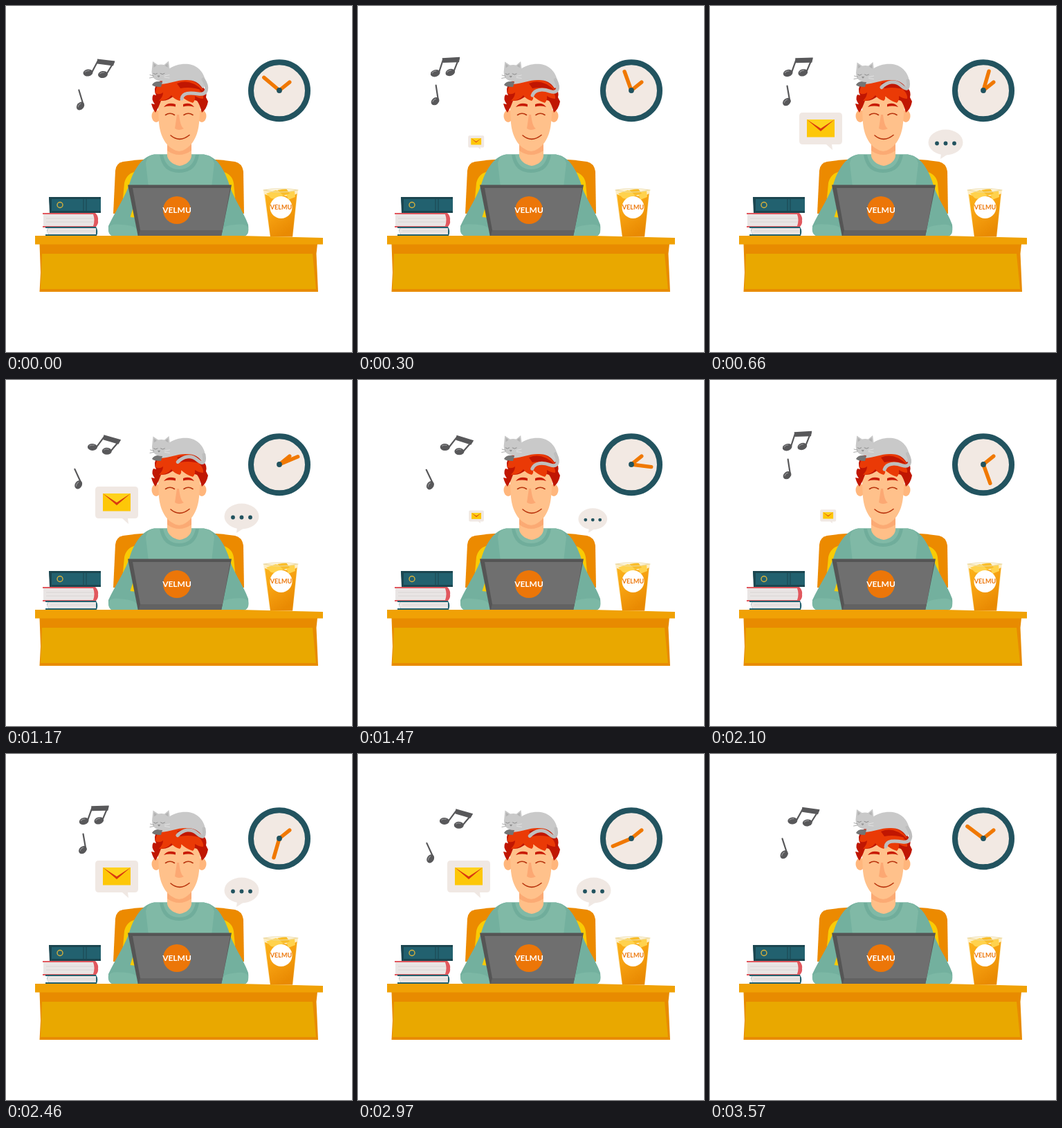
An HTML page for the animation above (3600 ms loop, 500 by 500 pixels).

```html
<!DOCTYPE html>
<html lang="en">
<head>
<meta charset="utf-8">
<title>Desk break</title>
<style>
html, body { margin: 0; width: 100%; height: 100%; overflow: hidden; background: #fff; }
svg { display: block; width: 100vw; height: 100vh; }
text { font-family: Lato, "Open Sans", sans-serif; font-weight: 700; text-anchor: middle; }
.line { fill: none; stroke-linecap: round; stroke-linejoin: round; }
</style>
</head>
<body>
<svg viewBox="0 0 500 500">
  <defs>
    <linearGradient id="juice" x1="0" y1="0" x2=".5" y2="1">
      <stop offset="0" stop-color="#fcb41c"/><stop offset=".5" stop-color="#f6a010"/>
      <stop offset="1" stop-color="#e98a02"/>
    </linearGradient>
  </defs>

  <!-- clock -->
  <circle cx="395" cy="122.300" r="41" fill="#f2e9e3" stroke="#22535f" stroke-width="8"/>
  <g class="line" stroke="#f07800" stroke-width="5.400">
    <path d="M395 122V103" transform="rotate(51 395 122)"/>
    <path id="minute" d="M395 122V93"/>
  </g>
  <circle cx="395" cy="122" r="3.900" fill="#22535f"/>

  <!-- music -->
  <g id="pair" fill="#58585a">
    <ellipse cx="118.500" cy="96.500" rx="7" ry="5" transform="rotate(-8 118.500 96.500)"/>
    <ellipse cx="140" cy="99" rx="7" ry="5" transform="rotate(-8 140 99)"/>
    <path d="M132 76.500L157.500 79.500L155 86.500L132 83.500Z"/>
    <path class="line" d="M124 96L133 79M145.500 98L155.800 81" stroke="#58585a" stroke-width="2.200"/>
    <path class="line" d="M114 95.500Q116.500 93 120.500 93.500M135.500 98Q138 95.500 142 96" stroke="#98989a" stroke-width="1"/>
  </g>
  <g id="single" fill="#58585a">
    <ellipse cx="107.500" cy="144.500" rx="6.500" ry="5" transform="rotate(-50 107.500 144.500)"/>
    <path class="line" d="M112 143.500L105.300 121.500" stroke="#58585a" stroke-width="2.200"/>
    <path class="line" d="M104 146Q105 142 108 141" stroke="#98989a" stroke-width="1"/>
  </g>

  <!-- chair -->
  <path d="M155 300L158 238Q159 227 169 225Q250 214 331 225Q341 227 343 239L344 300Z" fill="#ec8a00"/>
  <path d="M165 320L171 256Q174 242 188 239H312Q327 243 329 256L335 320Z" fill="#f9cb05"/>

  <!-- body -->
  <path d="M214 214.500C198 217 187 233 180 252C174 274 158 296 148 318Q147 333 158 333H342Q352 333 350 316C343 296 327 276 321 253C314 234 304 217 286 214.500Z" fill="#73b09e"/>
  <path d="M214 214.500Q203 217 202 227L206 262H297L301 227Q299 217 286 214.500Z" fill="#80b9a6"/>
  <path d="M222 215Q226 241 250 241Q275 241 279 215Z" fill="#70ad9b"/>
  <path d="M227 215Q231 236 250 236Q270 236 274 215Z" fill="#80b9a6"/>
  <path d="M184.500 289L179.500 305L188 306Z" fill="#f9cb05"/>
  <path id="armL" d="M148 321Q150 314 167 316Q187 317 190 324V333H158Q147 333 148 321Z" fill="#7cb8a5"/>
  <path id="armR" d="M350 321Q348 314 331 316Q315 317 310 324V333H340Q352 333 350 321Z" fill="#7cb8a5"/>

  <!-- head -->
  <path d="M233 190H268V217Q266 228 251 231Q236 228 233 217Z" fill="#ffbf88"/>
  <path d="M233 198Q250 222 268 198V209Q250 221 233 209Z" fill="#fbaa74"/>
  <ellipse cx="217" cy="159" rx="6.500" ry="9" fill="#ffb67c"/>
  <ellipse cx="283" cy="159" rx="6.500" ry="9" fill="#ffb67c"/>
  <path d="M219 132Q250 112 282 132L279 169C277 191 266 208 250 209C234 208 223 191 221 169Z" fill="#ffc18b"/>
  <path d="M247 157L244 177Q250 181 257 177Q252 175 250 157Z" fill="#fca873"/>
  <g class="line" stroke="#b8330c" stroke-width="1.600">
    <path d="M230.500 157.500Q237 153 243.500 157.500M257 157.500Q263.500 153 270 157.500"/>
    <path d="M238 187Q251 198 265 186.500"/>
  </g>
  <path d="M228 146Q234 138 245 142V145.500Q236 143.500 228 146ZM256 142Q266 138 272 146Q264 143.500 256 145.500Z" fill="#c81a02"/>
  <path d="M216 154Q212 149 210 141L215 142Q209 134 213 128L217 129Q212 120 219 111Q232 99 257 102Q281 104 286 119Q291 123 289 132L292 138Q290 149 283 154Q280 142 276 137Q262 133 245 128Q234 138 224 137Q221 146 216 154Z" fill="#c01602"/>
  <path d="M217 120Q222 104 254 105Q276 106 285 122L279 121Q286 127 285 134Q279 134 273 130Q274 136 270 140Q260 137 253 130Q254 135 251 137Q243 135 239 129Q233 137 221 137Q227 131 227 125Q222 129 216 126Z" fill="#ea3a06"/>
  <path d="M247 112Q266 104 284 122Q268 116 252 119Z" fill="#c01602"/>

  <!-- cat -->
  <path d="M233 93C243 84 256 83 264 84C278 86 288 98 288 111Q288 117 284 119C279 111 272 107 262 107C249 106 238 112 224 113Z" fill="#c9c9c9"/>
  <path class="line" id="tail" stroke="#bebebe" stroke-width="5"/>
  <path d="M211 114Q215 107 226 110L224 117Q213 117 211 114Z" fill="#747474"/>
  <g id="catHead">
    <path d="M212 80L219.500 85Q224 84 228.500 85L235 79.500L237 95Q238 108 224.500 108.500Q211 108 210.500 95Z" fill="#c9c9c9"/>
    <path d="M213.500 83L217.500 86L213.500 89ZM233.500 83L229.500 86L234 89Z" fill="#b2b2b2"/>
    <g class="line" stroke="#858585" stroke-width=".9">
      <path d="M213 97.500Q215.500 100 218.500 97.500M223 97.500Q226 100 229 97.500"/>
      <path d="M219.500 101H222L220.800 102.500Z"/>
      <path d="M213 101L208 99.500M213 103L207.500 104" stroke-width=".7"/>
      <path d="M229 101L236 99.500M229 103L236 104" stroke="#e8e8e8" stroke-width=".8"/>
    </g>
  </g>

  <!-- laptop -->
  <path d="M176 258.500H326L311 333.500H191Z" fill="#555"/>
  <path d="M183 263H324L313 324H194Z" fill="#6f6f6f"/>
  <path d="M194 324H313L311 332H192Z" fill="#626262"/>
  <circle cx="247" cy="295" r="20" fill="#ec7608"/>
  <text x="247" y="299.300" font-size="12" fill="#fff">VELMU</text>

  <!-- books -->
  <path d="M62 276H137V299H64Z" fill="#22616f"/>
  <path d="M62 276H137V279H66V296H137V299H63Z" fill="#1b4650"/>
  <path d="M112 279V296M116 279V296" stroke="#1b4650"/>
  <circle cx="78" cy="287.500" r="4" fill="none" stroke="#d9b23c" stroke-width="1.400"/>
  <path d="M53 299H129Q134 304 133 310Q134 315 129 320H53V318H57Q53 309 57 301H53Z" fill="#e1585e"/>
  <path d="M54 301H126Q129 309 126 318H54Z" fill="#e9e5e4"/>
  <path d="M57 319H130Q134 325 131 332H57V330H62Q57 325 61 321H57Z" fill="#22616f"/>
  <path d="M61 321H130V330H62Q57 326 61 321Z" fill="#e9e5e4"/>
  <path d="M58 307H126M58 312H126M64 325H129" stroke="#d9d4d3"/>

  <!-- cup -->
  <path d="M372 266H422L414.500 333.500H381.500Z" fill="#fdeec5"/>
  <path d="M374 272Q386 278 398 273Q411 278 420.500 271L414 333.500H382Z" fill="url(#juice)"/>
  <path d="M376 271L390 266L402 271L396 280L383 278ZM404 269L417 267L418 276L408 280Z" fill="#ffd24d"/>
  <path d="M392 266L405 264L410 271L401 274Z" fill="#f9bd2a"/>
  <path class="line" d="M372 266Q397 262 422 266Q397 272 372 266Z" stroke="#ecd9a0" stroke-width="1.200"/>
  <circle cx="397.500" cy="291" r="16" fill="#fff"/>
  <text x="397.500" y="294.300" font-size="9" fill="#ec7608">VELMU</text>

  <!-- desk -->
  <path d="M48.500 344H450L448.500 358L451 413H48.500L50 385Z" fill="#e88b00"/>
  <path d="M52 358H443L448 409H50Z" fill="#e9a800"/>
  <path d="M42 332H338L458 335V344.500H42Z" fill="#f0a105"/>

  <!-- bubbles -->
  <g id="mail">
    <path d="M134 154H186Q191 154 191 159V195Q191 200 186 200H176L177 208L168 200H134Q129 200 129 195V159Q129 154 134 154Z" fill="#f0e8e3"/>
    <path d="M140 164H180V189.500H140Z" fill="#fdc708"/>
    <path d="M140 164H180L160 179Z" fill="#ffd21c"/>
    <path d="M140 164L160 177L180 164L160 181Z" fill="#d93a10"/>
  </g>
  <g id="chat">
    <path d="M334 213L333 221L344 214Z" fill="#f0e8e3"/>
    <ellipse cx="340.500" cy="197" rx="25" ry="18.500" fill="#f0e8e3"/>
    <g fill="#22535f"><circle cx="328" cy="198.500" r="2.900"/><circle cx="340.500" cy="198.500" r="2.900"/><circle cx="353" cy="198.500" r="2.900"/></g>
  </g>
</svg>
<script>
const LOOP = 3600, BEAT = 1800, TAU = Math.PI * 2;
const $ = id => document.getElementById(id);
const move = (id, value) => $(id).setAttribute('transform', value);
const clamp = v => Math.max(0, Math.min(1, v));

const tailLow = [285, 106, 293, 118, 291, 129, 278, 127, 266, 125, 255, 125, 254, 134];
const tailHigh = [286, 108, 288, 121, 284, 122, 276, 115, 267, 107, 256, 110, 248, 118];

function tailPath(k) {
  const p = tailLow.map((v, i) => (v + (tailHigh[i] - v) * k).toFixed(2));
  return `M${p.slice(0, 2)}C${p.slice(2)}`;
}

// Grows a bubble out of its pointer, then shrinks it back.
function pop(id, x, y, t, start, end) {
  const u = clamp(Math.min((t - start) / 150, (end - t) / 150));
  const s = u * (2 - u);
  move(id, `translate(${x} ${y}) scale(${s}) translate(${-x} ${-y})`);
  $(id).style.display = s > 0 ? '' : 'none';
}

function draw(time) {
  const t = time % BEAT;
  const phase = TAU * t / BEAT;
  const sway = Math.sin(phase);
  const lift = (1 - Math.cos(phase)) / 1.63;
  const tap = Math.sin(phase * 5);

  move('minute', `rotate(${310 + time * 360 / LOOP} 395 122)`);
  move('pair', `rotate(${-11.2 * sway} 119 137)`);
  move('single', `rotate(${9.5 * sway} 157 169)`);
  $('tail').setAttribute('d', tailPath(lift));
  move('catHead', `translate(${0.5 * lift} ${1.5 * lift})`);
  move('armL', `rotate(${1.5 * tap} 150 330)`);
  move('armR', `rotate(${1.5 * tap} 348 330)`);
  pop('mail', 177, 207, t, 270, 1500);
  pop('chat', 333, 220, t, 360, 1560);
}

const origin = performance.now();
function tick() {
  draw((performance.now() - origin) % LOOP);
  requestAnimationFrame(tick);
}
draw(0);
requestAnimationFrame(tick);
</script>
</body>
</html>
```
